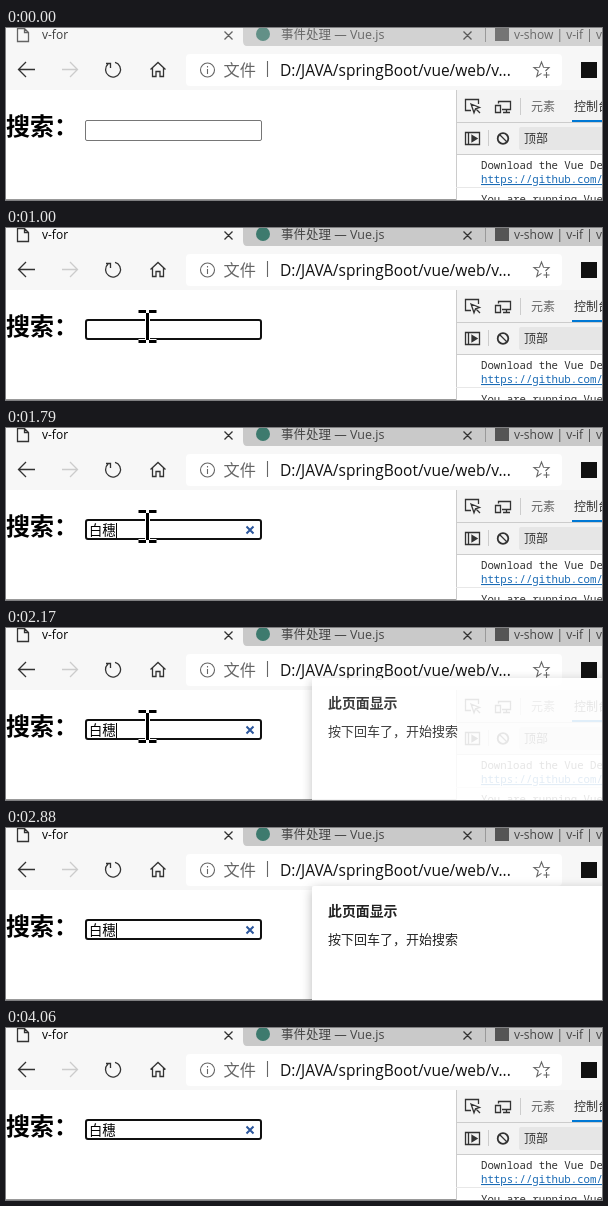
Recreate the animation shown at these times as an HTML page. Size 596 px wide and 172 px high, loop 4.53 s.

```html
<!DOCTYPE html>
<html lang="zh-CN">
<head>
<meta charset="utf-8">
<style>
html, body { margin: 0; width: 100%; height: 100%; overflow: hidden; background: #fff; }
svg { display: block; width: 596px; height: 172px; }
text { font-family: "Open Sans", "Noto Sans CJK SC", "Noto Sans CJK", sans-serif; white-space: pre; }
.field { font-family: "Liberation Sans", "Noto Sans CJK SC", "Noto Sans CJK", sans-serif; font-size: 13.33px; }
.mono { font-family: "Noto Sans Mono", monospace; font-size: 10.7px; fill: #303030; }
.line { fill: none; stroke: #333; stroke-width: 1.3; }
</style>
</head>
<body>
<svg viewBox="0 0 596 172">
  <defs>
    <filter id="shadow" x="-20%" y="-30%" width="140%" height="160%">
      <feDropShadow dx="0" dy="3" stdDeviation="5.5" flood-opacity=".28"/>
    </filter>
    <path id="ibeam" fill="none" d="M-9-15H-1.5M1.5-15H9M0-13.5V13.5M-9 15H-1.5M1.5 15H9"/>
  </defs>

  <!-- browser chrome -->
  <rect width="596" height="62" fill="#f7f7f7"/>
  <path id="strip" d="M237 0H596V18H241Q237 18 237 13Z"/>
  <path d="M479.5 0V14" stroke="#999"/>
  <g id="tabs" font-size="12">
    <path class="line" d="M11.5 .5H18.5L22.5 4.5V13.5H11.5ZM18.5 .5V4.5H22.5"/>
    <text x="36" y="11">v-for</text>
    <circle cx="257" cy="6" r="7" fill="#3d7a6e"/>
    <text x="275" y="11" font-size="12.5" fill="#444">事件处理 — Vue.js</text>
    <rect x="489" y="0" width="14" height="13" fill="#555"/>
    <text x="508" y="11" fill="#444">v-show | v-if | v-for</text>
    <path class="line" d="M218.5 3.5l8 8m0-8l-8 8M457.5 3.5l8 8m0-8l-8 8"/>
  </g>
  <path class="line" d="M29 41.5H13M20 34l-7.5 7.5L20 49"/>
  <path class="line" d="M56 41.5H71M64 34l7.5 7.5L64 49" style="stroke:#ccc"/>
  <path class="line" d="M109 34.3A7.5 7.5 0 1 1 102 36M100 35.5H104.5V40"/>
  <path class="line" d="M144.5 41.5L152 34.5L159.5 41.5M146.5 40V48.5H150V43.5H154V48.5H157.5V40"/>
  <rect x="180" y="26" width="376" height="32" rx="4" fill="#fff"/>
  <g class="line" style="stroke:#666;stroke-width:1.1">
    <circle cx="201.5" cy="42" r="7"/>
    <path d="M201.5 41V46M201.5 38V39.5M261.5 33V49"/>
    <path transform="translate(535.5 42)" d="M4 1L7.6-2.5L2-2.7L0-8L-2-2.7L-7.6-2.5L-3.2 1L-4.7 6.5L0 3.4M2 5h6m-3-3v6"/>
  </g>
  <text x="217.5" y="48" font-size="16.2" fill="#666">文件</text>
  <text x="274" y="47.5" font-size="15.5" fill="#111">D:/JAVA/springBoot/vue/web/v...</text>
  <rect x="575" y="34" width="16" height="16" fill="#111"/>

  <!-- page -->
  <text x="0" y="107" font-size="24" font-weight="700">搜索：</text>
  <path d="M0 171.5H450" stroke="#999"/>
  <rect id="box" fill="#fff"/>
  <text id="value" class="field" x="83" y="107"></text>
  <path id="under" stroke="#000" stroke-dasharray="1 1"/>
  <rect id="caret" y="95" width="1" height="15"/>
  <path id="clear" d="M240.5 98.5l7 7m0-7l-7 7" stroke="#2b569c" stroke-width="2"/>

  <!-- developer tools -->
  <rect x="450" y="62" width="146" height="110" fill="#fff"/>
  <rect x="450" y="62" width="146" height="64" fill="#f3f3f3"/>
  <path d="M450.5 62V172M450 94.5H596M450 126.5H596M514.5 70V87M482.5 102V118" stroke="#ccc" fill="none"/>
  <g class="line">
    <path d="M465 82.5H459.5V71.5H472.5V76M465 76l8.500 3.500-4 1.300-1.500 4zM470 81l4 4"/>
    <path d="M492.5 75.5V73.5H504.5V81.5H496M489.5 77.5H494.5V84.5H489.5ZM497 84.5H504M500.5 81.5V84.5"/>
    <path d="M459.5 104.5H473.5V116.5H459.5ZM462.5 104.5V116.5"/>
    <path d="M466 107.5l5 3-5 3z" fill="#333"/>
    <path d="M493.5 106.5l7.500 7.500"/>
    <circle cx="497" cy="110.5" r="5.3" style="stroke-width:1.8"/>
  </g>
  <text x="525" y="83" font-size="12" fill="#666">元素</text>
  <text x="568" y="83" font-size="12" fill="#333">控制台</text>
  <rect x="566" y="92" width="30" height="2" fill="#0078d4"/>
  <rect x="513" y="99" width="90" height="23" rx="2" fill="#e6e6e6"/>
  <text x="518" y="115" font-size="12" fill="#333">顶部</text>
  <text class="mono" x="475" y="141">Download the Vue Devtools</text>
  <text class="mono" x="475" y="155" style="fill:#1a6bb5" text-decoration="underline">https://github.com/vuejs</text>
  <path d="M450 159.5H596" stroke="#e8e8e8"/>
  <text class="mono" x="475" y="175">You are running Vue</text>

  <g id="ime"></g>

  <g id="dialog">
    <rect x="306" y="58" width="420" height="170" rx="2" fill="#fff" filter="url(#shadow)"/>
    <text x="322" y="88" font-size="13.9" font-weight="700" fill="#222">此页面显示</text>
    <text x="322" y="116" font-size="13" fill="#222">按下回车了，开始搜索</text>
  </g>

  <g id="beam">
    <use href="#ibeam" stroke="#fff" stroke-width="5"/>
    <use href="#ibeam" stroke="#000" stroke-width="3"/>
  </g>
  <path id="arrow" d="M0 0V24L5.500 19L9.500 27.500L13.500 25.500L9.700 17.500H17Z" fill="#fff" stroke="#000" stroke-width="1.2"/>
</svg>
<script>
const LOOP = 4530, FOCUS = 500, COMMIT = 1790, WORD = '白穗';
const $ = id => document.getElementById(id);
const show = (id, on) => $(id).style.display = on ? '' : 'none';
const set = (id, attrs) => Object.entries(attrs).forEach(([k, v]) => $(id).setAttribute(k, v));
const latest = (list, t) => list.filter(item => item[0] <= t).pop();

// time, typed letters, candidates
const typing = [
  [1300, 'b', '吧 不 把 被 比 本 并'],
  [1430, 'ba', '吧 把 巴 Ⅷ ⑧ 八 爸'],
  [1460, 'bai', '白 百 拜 败 摆 柏 掰'],
  [1530, "bai's", '白色 白水 百岁 百兽 败诉 白 百'],
  [1720, "bai'sui", WORD + ' 百岁 白 百 拜 败 摆']
];
// time, opacity, vertical shift
const dialogKeys = [
  [0, 0, -16], [2080, .45, -15], [2170, .88, -8], [2260, .98, -2], [2320, 1, 0],
  [3580, .7, -3], [3670, .25, -8], [3750, 0, -12]
];

function candidates(words) {
  let x = 77, cells = '';
  words.split(' ').forEach((word, i) => {
    const w = 43 + 17 * word.length;
    if (!i) cells += `<rect x="77" y="116" width="${w}" height="44" fill="#0078d7"/>`;
    cells += `<text x="${x + 17}" y="144" font-size="12" fill="${i ? '#888' : '#fff'}">${i + 1}</text>
      <text x="${x + 28}" y="145" font-size="17" fill="${i ? '#000' : '#fff'}">${word}</text>`;
    x += w;
  });
  return `<rect x="77.5" y="116.5" width="${x - 32}" height="43" fill="#fff" stroke="#0078d7"/>${cells}
    <path d="M${x + .5} 117V159" stroke="#0078d7"/>
    <g class="line" transform="translate(${x + 24} 138)"><circle r="8"/>
    <path d="M-4 2Q0 6.500 4 2M-3-3.500v2M3-3.500v2"/></g>`;
}

function pointer(t) {
  let x = 141.5, y = 98.5, visible = t >= 70 && t < 2880;
  if (t < FOCUS) {
    const left = 1 - (Math.floor((t - 70) / 86) + 1) / 6;
    x += 150 * left * left;
    y += 80 * left * left;
  } else if (t >= 2640) {
    const p = (Math.floor((t - 2640) / 80) + 1) / 3;
    x += 398 * p;
    y += 44 * p;
  }
  const text = y < 113 && x < 256;
  show('beam', visible && text);
  show('arrow', visible && !text);
  for (const id of ['beam', 'arrow']) set(id, { transform: `translate(${x} ${y})` });
}

let shown;
function draw(t) {
  const focus = t >= FOCUS, stage = t < COMMIT && latest(typing, t);
  const value = stage ? stage[1] : t >= COMMIT ? WORD : '';

  set('strip', { fill: focus ? '#c9c9c9' : '#d2d2d2' });
  set('tabs', { opacity: focus ? 1 : .75 });
  set('box', focus
    ? { x: 80, y: 92, width: 175, height: 19, rx: 2, stroke: '#101010', 'stroke-width': 2 }
    : { x: 79.5, y: 92.5, width: 176, height: 20, rx: 1.5, stroke: '#767676', 'stroke-width': 1 });

  if (value !== $('value').textContent) $('value').textContent = value;
  const end = value ? 83 + $('value').getComputedTextLength() : 83;
  set('caret', { x: Math.round(end) });
  show('caret', focus && t < 1000 || t >= 1300 && t < 4060);
  show('clear', value);
  set('under', { d: `M83 109.5H${end}` });
  show('under', stage);

  if (stage !== shown) {
    $('ime').innerHTML = stage ? candidates(stage[2]) : '';
    shown = stage;
  }

  const [, opacity, shift] = latest(dialogKeys, t);
  set('dialog', { opacity, transform: `translate(0 ${shift})` });
  show('dialog', opacity);
  pointer(t);
}

const start = performance.now();
function tick() {
  draw((performance.now() - start) % LOOP);
  requestAnimationFrame(tick);
}
tick();
</script>
</body>
</html>
```
